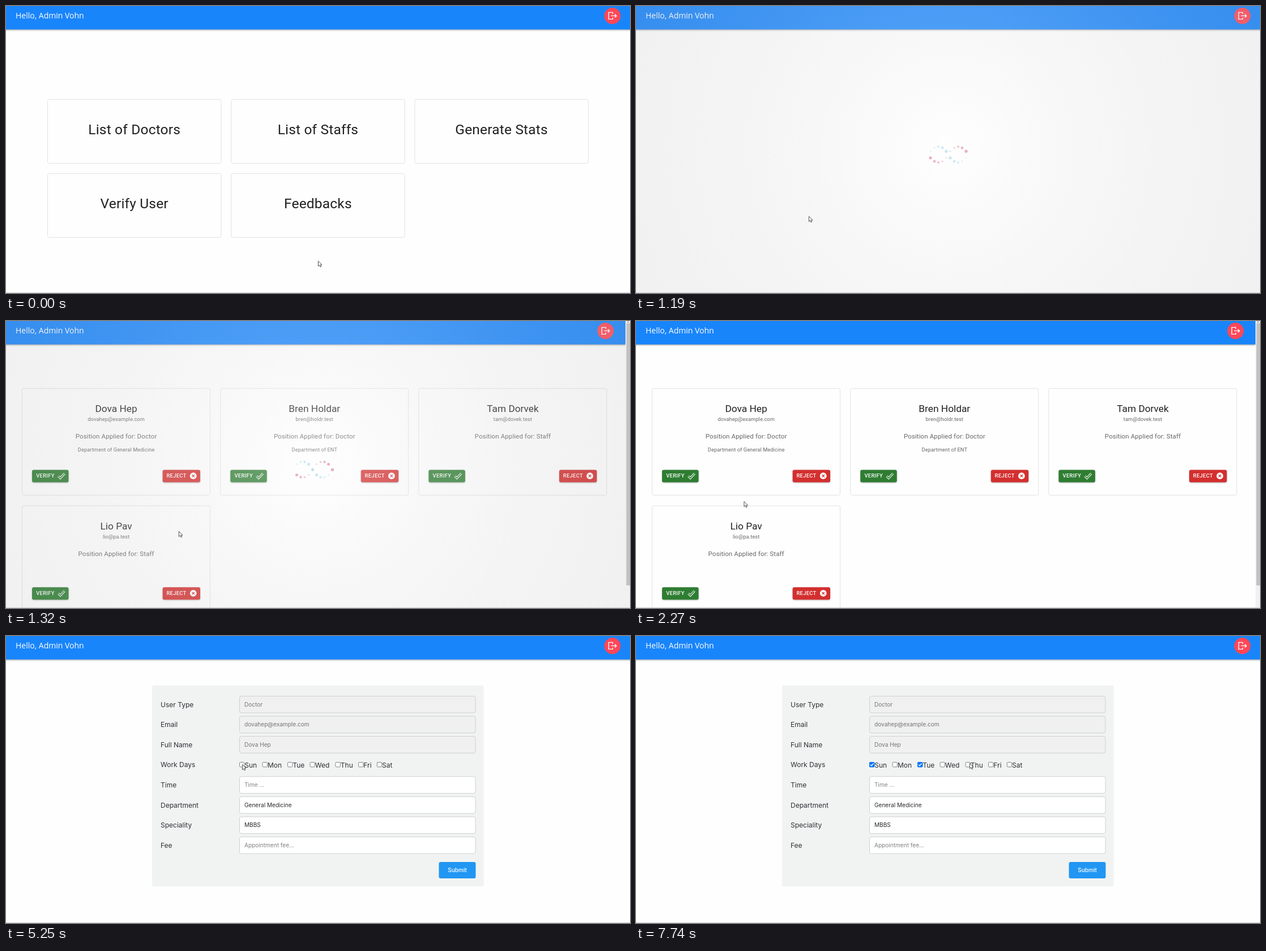
Recreate the animation shown at these times as an HTML page. Size 1102 by 508 pixels, loop 8 s.

```html
<!DOCTYPE html>
<html lang="en">
<head>
<meta charset="utf-8">
<title>Clinic admin</title>
<style>
  html, body { margin: 0; width: 100%; height: 100%; overflow: hidden; background: #fefefe; }
  svg { display: block; width: 1102px; height: 508px; font-family: Roboto, sans-serif; }
  .hello { font: 500 14px "Open Sans", "Noto Sans", sans-serif; fill: #fff; }
  .tile { font-size: 24.5px; letter-spacing: .00735em; fill: #212121; }
  .name { font-size: 17.3px; fill: #212121; }
  .position { font-size: 11.52px; letter-spacing: .00938em; fill: #666; }
  .small { font-size: 9.22px; letter-spacing: .01071em; fill: #666; }
  .action { font-size: 9.36px; font-weight: 500; letter-spacing: .33px; fill: #fff; }
  .form { font-family: Montserrat, Inter, sans-serif; font-size: 10.08px; }
  .label { font-size: 12px; fill: #2c3034; }
  .card { fill: #fefefe; stroke: #e2e2e2; }
  .hover { filter: drop-shadow(0 2px 2px rgba(0, 0, 0, .22)); }
  .button { filter: drop-shadow(0 1.2px 1px rgba(0, 0, 0, .28)); }
  .bar { filter: drop-shadow(0 1.5px 1.5px rgba(0, 0, 0, .4)); }
  .mid { text-anchor: middle; }
</style>
</head>
<body>
<svg id="stage" viewBox="0 0 1102 508">
  <defs>
    <radialGradient id="veil" gradientUnits="userSpaceOnUse" cx="551" cy="254" r="607">
      <stop offset="0" stop-color="#fff" stop-opacity=".29"/>
      <stop offset="1" stop-color="#b6b6b6" stop-opacity=".18"/>
    </radialGradient>
    <clipPath id="verifyClip"><rect x="46" y="263.5" width="64.5" height="22" rx="3"/></clipPath>
  </defs>
  <rect width="1102" height="508" fill="#fefefe"/>
  <g id="home"></g>
  <g id="list"></g>
  <g id="form" class="form"></g>
  <rect class="bar" id="bar" x="-6" y="-6" height="47.5" fill="#1985fb"/>
  <text class="hello" x="17" y="22.3">Hello, Admin Vohn</text>
  <g id="logout" fill="none" stroke="#fff" stroke-width="1.4">
    <circle r="14.5" fill="#ff4757" stroke="none"/>
    <path d="M.5-3.2V-6H-6.5V6H.5V3.2M-2.5 0H7M4.2-3L7.2 0L4.2 3"/>
  </g>
  <g id="loader">
    <rect x="-10" width="1122" height="508" fill="url(#veil)"/>
    <g id="dots"></g>
  </g>
  <g id="scrollbar">
    <rect x="1094" width="8" height="508" fill="#f1f1f1"/>
    <rect x="1095.5" y="4" width="6.5" height="464" fill="#c1c1c1"/>
    <path d="M1096.5 2.5L1098.5 .5L1100.5 2.5Z" fill="#777"/>
  </g>
  <path d="M0 507.5H1102" stroke="#cfcfcf"/>
  <path id="cursor" d="M.4.5V9.6L2.6 7.7L4.1 10.9L5.6 10.2L4.2 7.1H7Z" fill="#fff" stroke="#333" stroke-width=".85"/>
</svg>
<script>
const LOOP = 8000;
const $ = id => document.getElementById(id);
const show = (id, on) => $(id).setAttribute('display', on ? 'inline' : 'none');
const place = (id, x, y) => $(id).setAttribute('transform', `translate(${x} ${y})`);
const text = (cls, x, y, str, extra = '') => `<text class="${cls}" x="${x}" y="${y}" ${extra}>${str}</text>`;
const box = (x, y, w, h, attrs) => `<rect x="${x}" y="${y}" width="${w}" height="${h}" rx="3" ${attrs}/>`;

function buildHome() {
  const titles = ['List of Doctors', 'List of Staffs', 'Generate Stats', 'Verify User', 'Feedbacks'];
  $('home').innerHTML = titles.map((title, i) => {
    const x = 73.5 + (i % 3) * 324.2, y = 165.5 + Math.floor(i / 3) * 131;
    return box(x, y, 306.5, 113, `class="card" id="tile${i}"`) +
      text('tile mid', x + 153.2, y + 61.5, title);
  }).join('');
}

function buildList() {
  const people = [
    ['Dova Hep', 'dovahep@example.com', 'Doctor', 'Department of General Medicine'],
    ['Bren Holdar', 'bren@holdr.test', 'Doctor', 'Department of ENT'],
    ['Tam Dorvek', 'tam@dovek.test', 'Staff', ''],
    ['Lio Pav', 'lio@pa.test', 'Staff', '']
  ];
  const check = 'M92.5 274.6L96 278L103.5 270';
  $('list').innerHTML = people.map(([name, mail, role, department], i) => {
    const x = (i % 3) * 350.2, y = Math.floor(i / 3) * 207.7;
    return `<g transform="translate(${x} ${y})">` +
      box(28.5, 119.3, 332, 189, 'class="card"') +
      text('name mid', 194.6, 161.4, name) +
      text('small mid', 194.6, 177.2, mail) +
      text('position mid', 194.6, 208.3, `Position Applied for: ${role}`) +
      text('small mid', 194.6, 231.3, department) +
      `<g class="button" fill="#2e7d32" stroke="#2e7d32" id="verify${i}">` +
        box(46, 263.5, 64.5, 22, 'stroke="none"') +
        `<path d="${check}" fill="none" stroke="#fff" stroke-width="3.8"/>` +
        `<path d="${check}" fill="none" stroke-width="1.7"/></g>` +
      text('action', 53.2, 277.4, 'VERIFY') +
      box(276.6, 263.5, 66.4, 22, 'class="button" fill="#d32f2f"') +
      text('action', 283.4, 277.4, 'REJECT') +
      '<circle cx="330.7" cy="274.2" r="5.9" fill="#fff"/>' +
      '<path d="M328.5 272l4.4 4.4m0-4.4l-4.4 4.4" stroke="#d32f2f" stroke-width="1.3"/></g>';
  }).join('') + '<circle id="ripple" cx="84" cy="273" fill="#fff" opacity=".3" clip-path="url(#verifyClip)"/>';
}

function buildForm() {
  const rows = [
    ['User Type', 'Doctor', '#757575', '#f0f0f0'],
    ['Email', 'dovahep@example.com', '#757575', '#f0f0f0'],
    ['Full Name', 'Dova Hep', '#757575', '#f0f0f0'],
    ['Work Days'],
    ['Time', 'Time ...', '#858585', '#fff'],
    ['Department', 'General Medicine', '#2a2a2a', '#fff'],
    ['Speciality', 'MBBS', '#2a2a2a', '#fff'],
    ['Fee', 'Appointment fee...', '#808080', '#fff']
  ];
  const days = { Sun: 412, Mon: 452.6, Tue: 497, Wed: 536.5, Thu: 581.5, Fri: 622, Sat: 654.8 };
  const fields = rows.map(([label, value, ink, fill], i) => {
    const y = 121.2 + i * 35.6;
    return text('label', 273, y + 4.4, label) + (value
      ? box(412.5, y - 14.8, 416.5, 29.6, `fill="${fill}" stroke="#ced0d1"`) +
        text('', 421, y + 3.5, value, `fill="${ink}"`)
      : '');
  }).join('');
  const checks = Object.entries(days).map(([day, x]) =>
    `<rect x="${x - 2}" y="221" width="13" height="13" rx="3" fill="#0075ff" opacity=".25" id="ring${day}"/>` +
    `<rect x="${x + .5}" y="223.5" width="8.3" height="8.3" rx="1.6" fill="#fff" stroke="#767676" stroke-width=".9"/>` +
    `<g id="tick${day}"><rect x="${x}" y="223" width="9.3" height="9.3" rx="1.6" fill="#0075ff"/>` +
    `<path d="M${x + 1.9} 227.8l2 2l3.6-4.4" fill="none" stroke="#fff" stroke-width="1.4"/></g>` +
    text('label', x + 9.3, 232.8, day)).join('');
  $('form').innerHTML = box(258, 87.5, 585.7, 355.7, 'fill="#f1f3f2"') + fields + checks +
    box(764.5, 400, 65, 29, 'fill="#2196f3"') +
    text('mid', 797, 418, 'Submit', 'fill="#fff" font-weight="500"');
  Object.keys(days).forEach(day => { show('ring' + day, false); show('tick' + day, false); });
}

// Each move: start, end, number of steps, destination.
const moves = [
  [320, 590, 5, 305, 372],
  [2270, 2270, 1, 190.5, 319],
  [2660, 3080, 7, 84, 273],
  [4010, 4290, 5, 379, 283],
  [4550, 5250, 10, 417, 227],
  [5590, 6320, 10, 499, 228],
  [6390, 6390, 1, 499.6, 228],
  [6740, 7470, 9, 596, 228],
  [7540, 7740, 3, 589, 225]
];

function cursorAt(t) {
  let x = 551, y = 451;
  for (const [start, end, steps, toX, toY] of moves) {
    if (t < start) break;
    const done = end > start ? Math.floor((t - start) / (end - start) * (steps - 1) + 1) : steps;
    const k = Math.min(1, done / steps), ease = k * k * (3 - 2 * k);
    x += (toX - x) * ease;
    y += (toY - y) * ease;
  }
  return [x, y];
}

// Two strands of ten dots wind around each other.
function drawDots(t) {
  const turn = 18 + 18 * (t - 1190) / 130;
  let out = '';
  for (let i = 0; i < 20; i++) {
    const col = i >> 1, cyan = i & 1;
    const angle = (turn + 36 * col + 180 * cyan) * Math.PI / 180;
    const s = Math.sin(angle), depth = Math.cos(angle);
    const y = 263 + 14 * Math.sign(s) * Math.abs(s) ** .75;
    out += `<circle cx="${520 + 7 * col}" cy="${y}" r="${2 + .65 * depth}" ` +
      `fill="${cyan ? '#8fd3e3' : '#d9647e'}" opacity="${.38 + .14 * depth}"/>`;
  }
  $('dots').innerHTML = out;
}

function render(t) {
  const scene = t < 850 ? 'home' : t < 1300 ? 'blank' : t < 3360 ? 'list' : 'form';
  const listed = scene === 'list', loading = t >= 850 && t < 1460;
  for (const id of ['home', 'list', 'form']) show(id, id === scene);
  show('scrollbar', listed);
  $('bar').setAttribute('width', listed ? 1100 : 1114);
  place('logout', listed ? 1058.7 : 1070.9, 17.4);

  show('loader', loading);
  if (loading) {
    place('loader', listed ? -6.5 : 0, 0);
    drawDots(t);
  }

  const [x, y] = cursorAt(t);
  place('cursor', x, y);
  const within = (left, top, right, bottom) => x > left && x < right && y > top && y < bottom;
  $('tile3').classList.toggle('hover', within(73, 296, 380, 409));
  const green = within(46, 263, 111, 285.5) ? '#1b5e20' : '#2e7d32';
  $('verify0').setAttribute('fill', green);
  $('verify0').setAttribute('stroke', green);
  $('ripple').setAttribute('r', Math.max(0, Math.min(40, (t - 3270) * .4)));

  for (const [day, at] of [['Sun', 5520], ['Tue', 6670]]) {
    show('tick' + day, t >= at);
    show('ring' + day, t >= at && t < at + 200);
  }
}

buildHome();
buildList();
buildForm();
const began = performance.now();
function tick() {
  render((performance.now() - began) % LOOP);
  requestAnimationFrame(tick);
}
tick();
</script>
</body>
</html>
```
